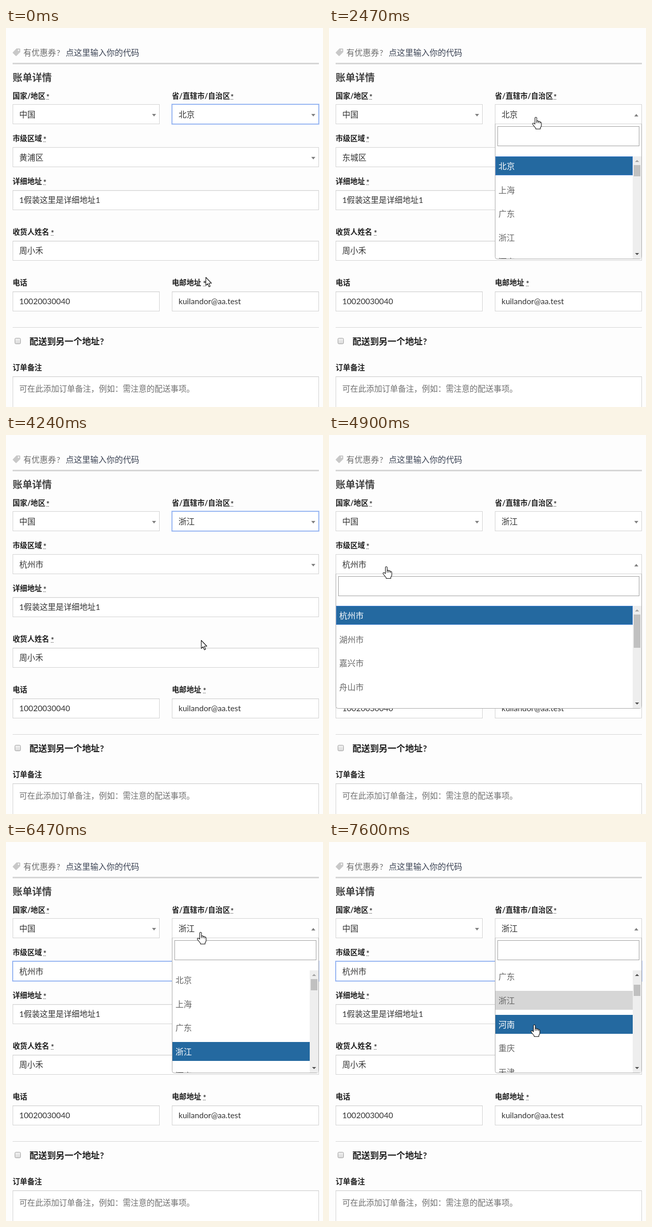
Write an HTML page with a canvas that moves like this. It is 621x741 px and loops after 8 s.

```html
<!DOCTYPE html>
<html lang="zh-CN">
<head>
<meta charset="utf-8">
<title>账单详情</title>
<style>
html, body { margin: 0; width: 100%; height: 100%; overflow: hidden; background: #fdfdfd; }
canvas { display: block; }
</style>
</head>
<body>
<canvas id="stage" width="621" height="741"></canvas>
<script>
const ctx = document.getElementById('stage').getContext('2d');
const LOOP = 8000, TICK = 60, PITCH = 46.67, ROW = 37, VIEW = 200;
const FONT = 'Lato, "Noto Sans CJK SC", "Noto Sans CJK", sans-serif';
const INK = '#333', LINE = '#d3d3d3', BLUE = '#2469a0';

const country = { x: 13, y: 149, w: 288 };
const province = {
  x: 325, y: 149, w: 288, listTop: 251, thumb: 22,
  rows: ['北京', '上海', '广东', '浙江', '河南', '重庆', '天津']
};
const city = {
  x: 13, y: 233, w: 600, listTop: 334, thumb: 65,
  rows: ['杭州市', '湖州市', '嘉兴市', '舟山市']
};

// Pointer moves: start, end, destination x, y
const moves = [
  [60, 120, 395, 502],
  [1870, 1870, 395, 499],
  [1930, 2290, 405, 163],
  [2470, 2890, 398, 422],
  [3200, 3500, 392, 406],
  [4240, 4720, 112, 257],
  [4960, 5380, 147, 445],
  [5690, 5690, 146, 432],
  [5750, 5750, 141, 407],
  [5810, 5870, 134, 350],
  [5930, 6410, 381, 176],
  [6720, 6990, 402, 357]
];

const handPath = new Path2D('M-1.5 14V2Q-1.5 .5 .2 .5Q2 .5 2 2V8Q4.5 6.5 5.2 8.8Q7.5 7.6 8.4 9.8' +
  'Q11 9.5 11 12V17Q11 19 9 21V23.5H0V22Q-2.5 19 -5.5 15Q-7 12.5 -5 12Q-3.5 11.7 -1.5 14Z');
const handCreases = new Path2D('M2 8V12M5.2 9V12M8.4 10V12.5');
const arrowPath = new Path2D('M.5 .5V16.3L4 13L6.6 19L9 18L6.5 12H11.5Z');
const tagPath = new Path2D('M20.5 40H26.5Q28 40 28 41.5V47L20.5 54.5Q19.7 55 19 54.5L13.4 49Q12.8 48.2 13.4 47.4Z' +
  'M26 43.5A1.4 1.4 0 1 0 23.2 43.5A1.4 1.4 0 1 0 26 43.5Z');

const between = (t, a, b) => t >= a && t < b;

// Eased progress that advances once per tick
function stepped(t, t0, t1) {
  if (t < t0) return 0;
  if (t >= t1) return 1;
  const n = Math.round((t1 - t0) / TICK) + 1;
  const p = (Math.floor((t - t0) / (t1 - t0) * (n - 1)) + 1) / n;
  return p * p * (3 - 2 * p);
}

function pointerAt(t) {
  let x = 391, y = 487;
  for (const [t0, t1, toX, toY] of moves) {
    const p = stepped(t, t0, t1);
    x += (toX - x) * p;
    y += (toY - y) * p;
  }
  return { x: Math.round(x), y: Math.round(y) };
}

const scrollAt = t => Math.round(100 * stepped(t, 7300, 7600));

function fill(color, x, y, w, h) {
  ctx.fillStyle = color;
  ctx.fillRect(x, y, w, h);
}

function frame(color, x, y, w, h) {
  ctx.strokeStyle = color;
  ctx.lineWidth = 1;
  ctx.strokeRect(x + .5, y + .5, w - 1, h - 1);
}

function text(str, x, midY, size, color = INK, weight = 400) {
  ctx.font = `${weight} ${size}px ${FONT}`;
  ctx.fillStyle = color;
  ctx.fillText(str, x, Math.round(midY + size * .38));
}

function triangle(x, y, half, height, color) {
  ctx.fillStyle = color;
  ctx.beginPath();
  ctx.moveTo(x - half, y - height / 2);
  ctx.lineTo(x + half, y - height / 2);
  ctx.lineTo(x, y + height / 2);
  ctx.fill();
}

function label(str, x, midY, starX) {
  text(str, x, midY, 14.35, '#1f1f1f', 700);
  if (!starX) return;
  text('*', starX, midY + 1.5, 14.35, INK, 700);
  for (let i = 0; i < 3; i++) fill(INK, starX + i * 2, midY + 6, 1, 1);
}

function input(str, x, y, w, h = 39, color = INK) {
  fill('#fff', x, y, w, h);
  fill('#f1f1f1', x + 1, y + 1, w - 2, 1);
  frame(LINE, x, y, w, h);
  text(str, x + 13, y + (h > 39 ? 24 : 19.5), 15.6, color);
}

function select(box, value, open, focused) {
  const { x, y, w } = box;
  fill('#fff', x, y, w, 39);
  frame(LINE, x, y, w, 39);
  if (focused) {
    frame('#b3c9f6', x - 1, y - 1, w + 2, 41);
    frame('#7fa5ee', x, y, w, 39);
  }
  text(value, x + 13, y + 20, 15.8);
  triangle(x + w - 11, y + 21.5, 4, open ? -5 : 5, '#808080');
}

function highlighted(box, selected, t) {
  const y = pointerAt(t - TICK).y;
  if (y < box.listTop) return selected;
  return Math.floor((y - box.listTop + scrollAt(t - TICK) + 4) / PITCH);
}

function dropdown(box, selected, t, ring) {
  const { x, y, w, listTop, rows, thumb } = box;
  const bottom = listTop + VIEW, right = x + w, scroll = scrollAt(t);
  const active = highlighted(box, selected, t);

  ctx.beginPath();
  ctx.roundRect(x + .5, y + 38.5, w - 1, bottom - y - 38, [0, 0, 4, 4]);
  ctx.fillStyle = '#fff';
  ctx.fill();
  ctx.strokeStyle = '#aaa';
  ctx.lineWidth = 1;
  ctx.stroke();
  fill(LINE, x + 1, y + 38, w - 2, 1);
  frame('#a0a0a0', x + 5, y + 43, w - 10, 39);

  ctx.save();
  ctx.beginPath();
  ctx.rect(x + 1, listTop, w - 2, VIEW);
  ctx.clip();
  rows.forEach((name, i) => {
    const top = Math.round(listTop + i * PITCH - scroll), width = right - 18 - x - 1;
    if (i === active) fill(BLUE, x + 1, top, width, ROW);
    else if (i === selected) fill('#d6d6d6', x + 1, top, width, ROW);
    if (ring && i === selected) frame(i === active ? '#3f7fd0' : '#83a7ea', x + 1, top, width, ROW);
    text(name, x + 7, top + 19, 16, i === active ? '#fff' : '#666');
  });

  fill('#eee', right - 18, listTop, 17, VIEW);
  fill('#c0c0c0', right - 16, listTop + 17 + Math.round(scroll * .11), 13, thumb);
  triangle(right - 9.5, listTop + 9, 4, -4, scroll ? '#505050' : '#a3a3a3');
  triangle(right - 9.5, bottom - 9, 4, 4, '#505050');
  ctx.restore();
}

function drawPointer(t, openBox) {
  const { x, y } = pointerAt(t);
  const inside = (b, bottom) => between(x, b.x, b.x + b.w) && between(y, b.y, bottom);
  const hand = [country, province, city].some(b => inside(b, b.y + 39)) ||
    openBox && inside(openBox, openBox.listTop + VIEW);
  const shape = hand ? handPath : arrowPath;
  ctx.save();
  ctx.translate(x, y);
  ctx.lineJoin = 'round';
  ctx.lineWidth = 1.1;
  ctx.fillStyle = '#fff';
  ctx.strokeStyle = '#111';
  ctx.fill(shape);
  ctx.stroke(shape);
  if (hand) ctx.stroke(handCreases);
  ctx.restore();
}

function drawCheckbox(x, y) {
  const shade = ctx.createLinearGradient(x, y, x, y + 12);
  shade.addColorStop(0, '#f2f2f2');
  shade.addColorStop(1, '#d9d9d9');
  ctx.beginPath();
  ctx.roundRect(x + .5, y + .5, 11, 11, 2);
  ctx.fillStyle = shade;
  ctx.fill();
  ctx.strokeStyle = '#a0a0a0';
  ctx.lineWidth = 1;
  ctx.stroke();
}

function drawPage() {
  fill('#fdfdfd', 0, 0, 621, 741);
  ctx.fillStyle = '#c8c8c8';
  ctx.fill(tagPath, 'evenodd');
  text('有优惠券', 34, 48, 16, '#6d6d6d');
  text('?', 99, 48, 16, '#6d6d6d');
  text('点这里输入你的代码', 117, 48, 16, '#3b4354');
  fill('#d6d6d6', 13, 68, 600, 3);
  text('账单详情', 13, 96.5, 19.2, '#444', 700);

  label('国家/地区', 13, 133, 79);
  label('省/直辖市/自治区', 325, 133, 440);
  label('市级区域', 13, 216, 73);
  label('详细地址', 13, 300, 73);
  label('收货人姓名', 13, 399, 88);
  label('电话', 13, 498);
  label('电邮地址', 325, 498, 386);
  label('订单备注', 13, 664);

  input('1假装这里是详细地址1', 13, 317, 600);
  input('周小禾', 13, 416, 600);
  input('10020030040', 13, 515, 288);
  input('kuilandor@aa.test', 325, 515, 288);
  input('可在此添加订单备注，例如：需注意的配送事项。', 13, 681, 600, 80, '#707070');

  fill('#d6d6d6', 13, 585, 600, 1);
  drawCheckbox(17, 606);
  text('配送到另一个地址', 46, 612, 17.2, '#1f1f1f', 700);
  text('?', 184, 612, 17.2, '#1f1f1f', 700);
}

function render(t) {
  const picked = t >= 3200;
  const provinceOpen = between(t, 2470, 3200) || t >= 6470;
  const cityOpen = between(t, 4900, 5930);
  const district = t < 620 ? '黄浦区' : t < 4240 ? '东城区' : '杭州市';

  drawPage();
  select(country, '中国');
  select(province, picked ? '浙江' : '北京', provinceOpen, t < 2470 || between(t, 3200, 4900));
  select(city, district, cityOpen, t >= 5930);
  if (provinceOpen) dropdown(province, picked ? 3 : 0, t, !picked);
  if (cityOpen) dropdown(city, 0, t, true);
  drawPointer(t, provinceOpen ? province : cityOpen ? city : null);
}

function loop() {
  render(performance.now() % LOOP);
  requestAnimationFrame(loop);
}
loop();
</script>
</body>
</html>
```
